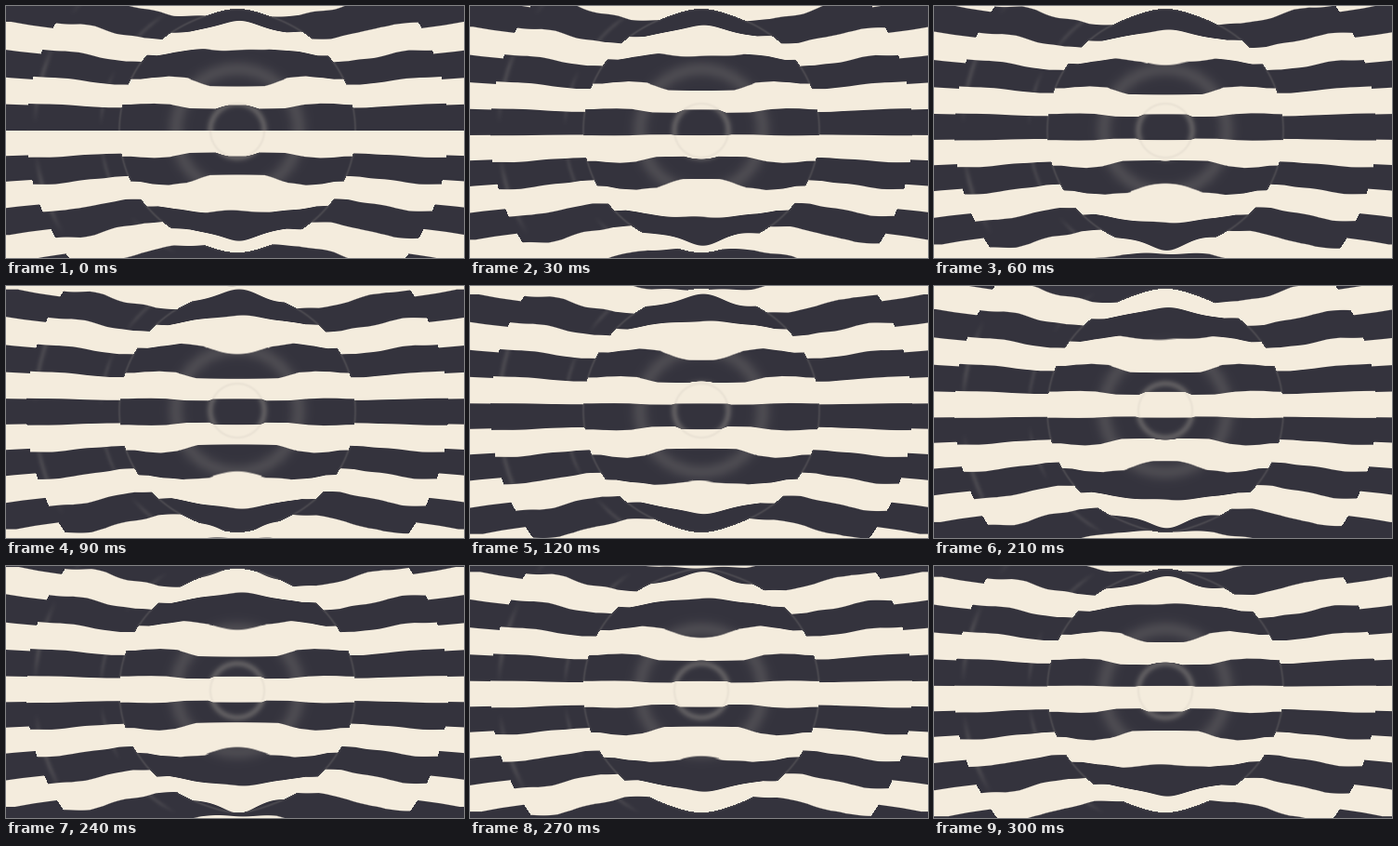
These frames come from a looping animation (493 px wide and 271 px high, 330 ms). An HTML page with a canvas:

```html
<!DOCTYPE html>
<html lang="en">
<head>
<meta charset="utf-8">
<title>Stripes behind rippled glass</title>
<style>
  html, body { margin: 0; width: 100%; height: 100%; overflow: hidden; background: #f4ecdd; }
  canvas { display: block; }
</style>
</head>
<body>
<canvas id="stage" width="493" height="271"></canvas>
<script>
const W = 493, H = 271, CX = 249, CY = 134;
const PERIOD = 55, STEPS = 11, STEP_MS = 30;
const CREAM = [244, 236, 221], DARK = [52, 51, 61], GREY = [150, 146, 140];

// Vertical magnification of the glass by radius; each list is one ring.
const INNER = [[0, .98], [29, 1], [33, 1.17], [46, 1.16], [56, 1.15], [62, 1.1],
  [69, 1.04], [78, .975], [94, .94], [108, .95], [118, .98], [127, .985]];
const MIDDLE = [[126, 1.12], [141, 1.11], [152, 1.08], [167, 1.05], [190, .985], [204, .96], [228, .95]];
const OUTER = [[226, 1.04], [250, 1.01], [270, .98]];

const clamp = v => Math.max(0, Math.min(1, v));
const bell = (v, width) => Math.exp(-((v / width) ** 2));

function lerpPoints(points, v) {
  const i = points.findIndex(p => p[0] > v);
  if (i < 0) return points[points.length - 1][1];
  if (i === 0) return points[0][1];
  const [x0, y0] = points[i - 1], [x1, y1] = points[i];
  return y0 + (y1 - y0) * (v - x0) / (x1 - x0);
}

const rimRadius = dx => 127 + 4 * bell(dx, 30);

function refract(dx, dy, r) {
  if (r >= 227) return dy * (lerpPoints(OUTER, r) - (dy < 0 ? .04 : 0));
  const ripple = r > 75 ? .006 * Math.sin(dx * .11 + dy * .03) : 0;
  if (r >= rimRadius(dx)) return dy * (lerpPoints(MIDDLE, r) + ripple);
  const bulge = .08 * (dy / r) ** 2 - .13 * bell(dx, 30);
  return dy * (lerpPoints(INNER, r) + ripple + bulge * clamp((r - 95) / 23));
}

// Reflections, as the amount of grey mixed into the dark stripes.
function reflect(dx, dy, r) {
  const patch = dx < 0 ? clamp(.5 + Math.sin(Math.atan2(dy, dx) * 11 + 2) * .7) : 0;
  return .24 * bell(r - 66, 9)
    + .4 * bell(r - 29, 4)
    + .22 * bell(r - rimRadius(dx), 1.2)
    + .2 * patch * bell(r - 218, 3)
    + .15 * patch * bell(r - 147, 2.5);
}

const source = new Float32Array(W * H), shine = new Float32Array(W * H), ring = new Float32Array(W * H);
for (let y = 0, i = 0; y < H; y++) {
  for (let x = 0; x < W; x++, i++) {
    const dx = x + .5 - CX, dy = y + .5 - CY, r = Math.hypot(dx, dy);
    source[i] = refract(dx, dy, r);
    shine[i] = reflect(dx, dy, r);
    ring[i] = .1 * bell(r - 29, 1.5);
  }
}

const ctx = document.getElementById("stage").getContext("2d");
const image = ctx.createImageData(W, H);
const mix = (a, b, t) => a + (b - a) * t;

function draw(step) {
  const half = PERIOD / 2, shift = step * PERIOD / STEPS;
  for (let i = 0; i < W * H; i++) {
    const s = source[i] - shift + half / 2 + half + PERIOD * 8;
    const ink = clamp(half / 2 - Math.abs(s % PERIOD - half) + .5);
    for (let c = 0; c < 3; c++) {
      const light = mix(CREAM[c], GREY[c], ring[i]);
      const dark = mix(DARK[c], GREY[c], shine[i]);
      image.data[i * 4 + c] = mix(light, dark, ink);
    }
    image.data[i * 4 + 3] = 255;
  }
  ctx.putImageData(image, 0, 0);
}

let shown = -1;
function tick() {
  const step = Math.floor(performance.now() / STEP_MS) % STEPS;
  if (step !== shown) draw(shown = step);
  requestAnimationFrame(tick);
}
tick();
</script>
</body>
</html>
```
